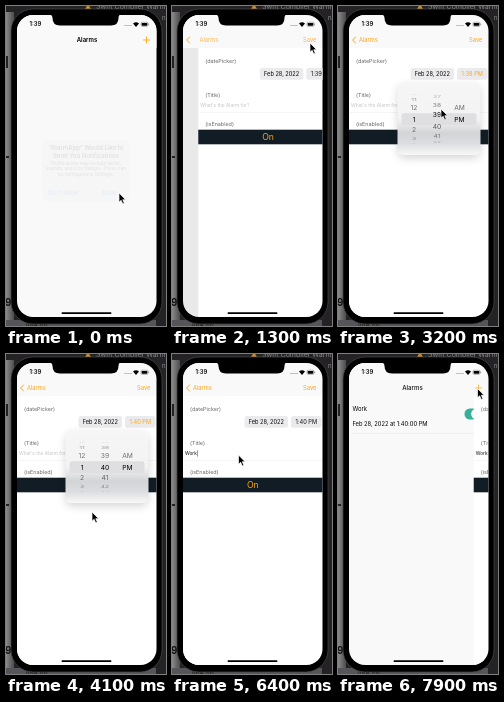
Recreate the animation shown at these times as an HTML page. Size 160 by 320 pixels, loop 8 s.

```html
<!DOCTYPE html>
<html lang="en">
<head>
<meta charset="utf-8">
<title>Alarm app</title>
<style>
  html, body { margin: 0; width: 100%; height: 100%; overflow: hidden; background: #222; }
  svg { display: block; width: 100%; height: 100%; font-family: Inter, "Liberation Sans", sans-serif; }
  text { white-space: pre; }
</style>
</head>
<body>
<svg id="stage" viewBox="0 0 160 320"></svg>
<script>
const LOOP = 8000, STEP = 100;
const ORANGE = '#f9a61a', NAVY = '#111c25', PAPER = '#f9f9f9', INK = '#111';

const text = (x, y, str, size, attrs = '') =>
  `<text x="${x}" y="${y}" font-size="${size}" ${attrs}>${str}</text>`;
const rect = (x, y, w, h, fill, attrs = '') =>
  `<rect x="${x}" y="${y}" width="${w}" height="${h}" fill="${fill}" ${attrs}/>`;
const mid = 'text-anchor="middle"';
const stops = list => list.map(([at, color]) => `<stop offset="${at}" stop-color="${color}"/>`).join('');

const defs = `<defs>
  <clipPath id="screen">${rect(11, 9, 139.5, 302, '#000', 'rx="16"')}</clipPath>
  <linearGradient id="side">${stops([[0, '#8a8a8a'], [1, '#4c4c4c']])}</linearGradient>
  <linearGradient id="glass" x2="0" y2="1">${stops([[0, '#f6f6f6'], [.5, '#f3f3f3'], [.7, '#d3d4d6'], [.84, '#dcdde0'], [1, '#f8f8f8']])}</linearGradient>
  <filter id="soft" x="-30%" y="-30%" width="160%" height="160%"><feGaussianBlur stdDeviation="5"/></filter>
</defs>`;

const backdrop =
  rect(0, 0, 160, 320, '#242225') +
  rect(0, 6, 8, 314, 'url(#side)') +
  rect(0, 314, 150, 6, '#55555a') +
  rect(0, 50, 2, 12, '#222') + rect(0, 150, 3, 2, '#222') +
  text(-1, 300, '9', 10, 'font-weight="700" fill="#111"') +
  text(20, 322, 'line on', 7, 'fill="#161616"') +
  '<path d="M79 3 82 -2 85 3Z" fill="#c98a2b"/>' +
  text(90, 2.5, 'Swift Compiler Warning', 7, 'fill="#8d8d90"') +
  text(156, 14, 'n', 6, 'fill="#8d8d90"') +
  rect(5, 3, 151, 315, '#000', 'rx="22" stroke="#4a4a4c" stroke-width=".7"');

const statusBar =
  '<path d="M43 8H115Q112.500 9 112.500 12Q112.500 19.500 105 19.500H54Q46.500 19.500 46.500 12Q46.500 9 43 8Z"/>' +
  text(23.5, 20, '1:39', 5.8, 'font-weight="600"') +
  [119, 121, 123, 125].map(x => `<circle cx="${x}" cy="19.500" r=".55" fill="#777"/>`).join('') +
  '<path d="M127 17.600Q130 14.900 133 17.600L130 21Z"/>' +
  rect(135, 16.2, 7, 4.2, 'none', 'rx="1.2" stroke="#777" stroke-width=".5"') +
  rect(135.7, 16.9, 5.6, 2.8, '#000', 'rx=".7"') + rect(142.5, 17.6, .6, 1.5, '#777');

const list = `<g id="list">
  ${rect(11, 9, 140, 302, PAPER)}
  <g id="row">
    ${text(19, 57.2, 'Work', 5.9)}
    ${text(19, 71.6, 'Feb 28, 2022 at 1:40:00 PM', 5.75)}
    ${rect(19, 79, 132, .4, '#dedee0')}
    ${rect(131, 54.5, 17, 11, '#36b097', 'rx="5.500"')}
    <circle cx="142.500" cy="60" r="4.800" fill="#fff"/>
  </g></g>`;

const caption = (y, str) => text(18, y, str, 5.4, 'fill="#666"');
const detail = `<g id="detail">
  ${rect(11, 42, 140, 270, '#fff')}
  ${caption(57, '(datePicker)')}
  ${rect(72.5, 62, 43.5, 11.7, '#ebebed', 'rx="2.500"')}
  ${text(94.3, 69.9, 'Feb 28, 2022', 5.6, mid)}
  ${rect(119, 62, 30.5, 11.7, '#ebebed', 'rx="2.500"')}
  ${text(134.3, 69.9, '', 5.7, mid + ' id="time"')}
  ${caption(90.5, '(Title)')}
  ${text(13, 101.3, '', 4.8, 'id="field"')}
  ${rect(25.6, 96.3, .7, 6.4, '#777', 'id="caret"')}
  ${rect(12, 106, 138, .4, '#e6e6e8')}
  ${caption(120.3, '(isEnabled)')}
  ${rect(11, 123.7, 140, 14.6, NAVY)}
  ${text(80.8, 134.2, 'On', 8.7, mid + ` fill="${ORANGE}"`)}
</g>`;

const nav = `${rect(11, 9, 140, 33, PAPER)}
  ${text(81, 36.3, 'Alarms', 6, mid + ' font-weight="600" id="title"')}
  <path id="plus" d="M137 34H144M140.500 30.500V37.500" stroke="${ORANGE}" stroke-width=".9"/>
  <path id="chevron" d="M17.800 30.700 14.600 34 17.800 37.300" fill="none" stroke="${ORANGE}" stroke-width="1"/>
  ${text(21, 36.3, 'Alarms', 5.7, `fill="${ORANGE}" id="back"`)}
  ${text(131, 36.3, 'Save', 5.8, `fill="${ORANGE}" id="save"`)}`;

const alertBox = `<g id="alert">
  ${rect(36, 134, 88, 62, '#dcdce2', 'rx="6"')}
  <g ${mid}>
    ${text(80, 143.5, '“AlarmApp” Would Like to', 6, 'font-weight="600"')}
    ${text(80, 151.5, 'Send You Notifications', 6, 'font-weight="600"')}
    ${text(80, 158.5, 'Notifications may include alerts,', 4.6)}
    ${text(80, 164.3, 'sounds, and icon badges. These can', 4.6)}
    ${text(80, 170, 'be configured in Settings.', 4.6)}
    ${text(57, 188.5, 'Don’t Allow', 5.8, 'fill="#06c"')}
    ${text(103, 188.5, 'Allow', 5.8, 'fill="#06c"')}
  </g></g>`;

const picker = `<g id="picker">
  ${rect(60, 80, 82, 72, '#000', 'rx="6" opacity=".17" filter="url(#soft)"')}
  ${rect(59.5, 77, 83, 72, 'url(#glass)', 'rx="5"')}
  ${rect(63.5, 107.3, 75, 11.6, '#dfdfe2', 'rx="2.500"')}
  <g id="wheels"></g>
</g>`;

const pointer = `<path id="pointer" d="M0 0V9.200L2.200 7.300 3.700 10.900 5.300 10.200 3.800 6.700H6.600Z"
  stroke="#fff" stroke-width=".7" stroke-linejoin="round"/>`;

document.getElementById('stage').innerHTML = defs + backdrop +
  `<g clip-path="url(#screen)">${list}${detail}${nav}${statusBar}${picker}${alertBox}
   ${rect(55.5, 306.2, 50, 1.8, '#000', 'rx=".9" id="home"')}</g>` + pointer;

const el = id => document.getElementById(id);
const set = (id, attrs) => { for (const k in attrs) el(id).setAttribute(k, attrs[k]); };
const shift = (x, y = 0) => `translate(${x} ${y})`;
const clamp = v => Math.max(0, Math.min(1, v));
const smooth = v => v * v * (3 - 2 * v);

// Critically damped spring from 0 to 1; t in ms, rate per second.
const spring = (t, rate) => {
  const k = Math.max(0, t) * rate / 1000;
  return 1 - (1 + k) * Math.exp(-k);
};

// Eased interpolation through [time, ...values] keys.
function track(keys, t) {
  const i = keys.findIndex(k => k[0] > t);
  if (i < 0) return keys[keys.length - 1].slice(1);
  if (i === 0) return keys[0].slice(1);
  const a = keys[i - 1], b = keys[i];
  const p = smooth((t - a[0]) / (b[0] - a[0]));
  return a.slice(1).map((v, n) => v + (b[n + 1] - v) * p);
}

const pointerPath = [
  [300, 113, 187], [900, 140, 35], [1300, 138, 37], [1800, 133, 65.5], [2300, 133, 65.5],
  [2600, 101, 112], [2800, 102, 122], [3000, 103, 118], [3200, 103, 103], [3500, 103, 96],
  [3750, 103, 96], [4100, 86, 158], [4200, 86, 158], [4650, 86, 95.5], [5250, 86, 95.5],
  [5700, 66.5, 101], [6600, 66.5, 101], [6900, 84, 136], [7400, 138, 36], [7900, 139.5, 34.5]
];
const minutePath = [[2600, 39], [2850, 38], [3000, 38], [3200, 39.35], [3500, 40]];

function wheel(x, value, label) {
  let out = '';
  for (let i = Math.ceil(value - 3); i <= value + 3; i++) {
    const angle = (i - value) * .46, str = label(i);
    if (!str || Math.abs(angle) > 1.4) continue;
    const squash = Math.cos(angle);
    const alpha = Math.abs(i - value) < .5 ? 1 : .62 * squash;
    out += `<g transform="translate(${x} ${113.1 + 25 * Math.sin(angle)}) scale(1 ${squash})" opacity="${alpha}">` +
      text(0, 2.4, str, 6.7, mid) + '</g>';
  }
  return out;
}

function render(t) {
  const page = t < 7550 ? spring(t - 950, 10.8) : 1 - spring(t - 7550, 10.8);
  const away = 1 - page;
  set('list', { transform: shift(-42 * page) });
  set('row', { opacity: t > 4000 ? 1 : 0 });
  el('list').firstElementChild.setAttribute('fill', page > .5 ? '#e9e9e9' : PAPER);
  set('detail', { transform: shift(140 * away), opacity: page > 0 ? 1 : 0 });

  set('title', { transform: shift(-60 * page), opacity: clamp(1 - page * 1.6) });
  set('back', { transform: shift(60 * away), opacity: clamp(page * 2 - 1) });
  set('chevron', { opacity: clamp(page * 1.2 - .15) });
  set('save', { opacity: clamp(page * 1.6 - .6) });
  set('plus', { opacity: clamp(1 - page * 2) });

  set('alert', { opacity: t < 100 ? .09 : t < 200 ? .03 : 0 });

  const open = t < 4150 ? spring(t - 2050, 16) : 1 - spring(t - 4150, 18);
  const scale = .42 + .58 * open;
  const active = t >= 2050 && t < 4250;
  set('picker', {
    transform: `translate(138 76) scale(${scale}) translate(-138 -76)`,
    opacity: open < .03 ? 0 : clamp(open * 1.25)
  });
  const [minute] = track(minutePath, t);
  el('wheels').innerHTML =
    wheel(76, 1, i => String((i + 11) % 12 + 1)) +
    wheel(99, minute, String) +
    wheel(121.5, 1, i => ['AM', 'PM'][i]);

  el('time').textContent = `1:${t < 2900 ? 39 : t < 3600 ? 38 : 40} PM`;
  set('time', { fill: active ? ORANGE : INK, opacity: active && t < 2400 ? .65 : 1 });

  const typed = 'Work'.slice(0, Math.max(0, Math.floor((t - 5800) / 100)));
  el('field').textContent = typed || 'What\'s the Alarm for?';
  set('field', { fill: typed ? INK : '#c5c5c8' });
  const caretX = typed ? 13 + el('field').getComputedTextLength() + .3 : 12.8;
  set('caret', { x: caretX, opacity: t >= 5600 && t < 7500 ? 1 : 0 });

  set('home', { opacity: t >= 4600 && t < 4800 ? .55 : 1 });
  set('pointer', { transform: shift(...track(pointerPath, t)) });
}

const start = performance.now();
function tick() {
  const t = (performance.now() - start) % LOOP;
  render(Math.floor(t / STEP) * STEP);
  requestAnimationFrame(tick);
}
tick();
</script>
</body>
</html>
```
